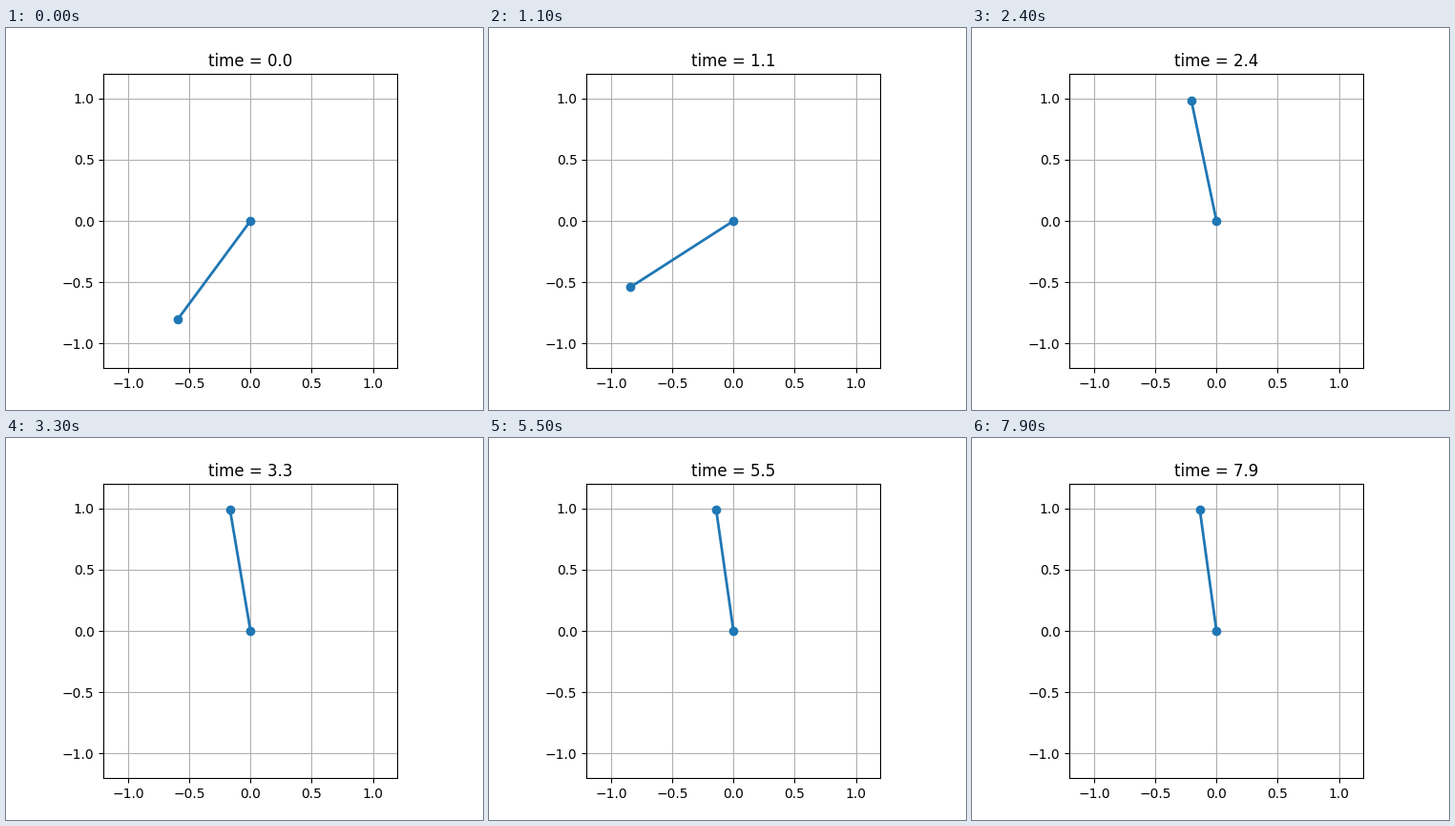
Write a matplotlib script that moves like this. It is 500 by 400 pixels and loops after 8000 ms.

```python
import numpy as np
import matplotlib.pyplot as plt
from matplotlib.animation import FuncAnimation

plt.rcParams["text.kerning_factor"] = 6

DT = 0.1
FRAMES = 80
SETTLED = 3.2

# Key poses: time in s, angle in degrees clockwise from straight down
KEY_T = np.array([0, 0.4, 0.78, 1.1, 1.3, 1.6, 1.8, 2.4, 2.7, SETTLED])
KEY_A = np.array([36.5, 56, 86, 57.3, 4, -102, -143.3, -191.8, -190.3, -189])
SPEED = np.gradient(KEY_A, KEY_T)
SPEED[[0, -1]] = 0


def swing(t):
    """Smooth cubic path through the key poses, resting after the last."""
    t = min(t, SETTLED)
    i = min(np.searchsorted(KEY_T, t, side="right"), len(KEY_T) - 1)
    h = KEY_T[i] - KEY_T[i - 1]
    s = (t - KEY_T[i - 1]) / h
    r = 1 - s
    return (r * r * ((1 + 2 * s) * KEY_A[i - 1] + s * h * SPEED[i - 1])
            + s * s * ((1 + 2 * r) * KEY_A[i] - r * h * SPEED[i]))


def balance(t):
    """Chatter around the balance point, drifting slowly upright."""
    gain = np.clip((t - 2.7) / 0.5, 0, 1)
    drift = 0.12 * max(t - SETTLED, 0)
    return 0.85 * gain * np.cos(2 * np.pi * (t - 4.25) / 0.4) + drift


fig, ax = plt.subplots(figsize=(5, 4), dpi=100)
ax.set_aspect("equal")
ax.set(xlim=(-1.2, 1.2), ylim=(-1.2, 1.2))
ax.grid()
rod, = ax.plot([], [], "o-", lw=2)
title = ax.set_title("")


def update(frame):
    t = frame * DT
    angle = np.radians(swing(t) + balance(t))
    rod.set_data([0, -np.sin(angle)], [0, -np.cos(angle)])
    title.set_text(f"time = {t:.1f}")
    return rod, title


anim = FuncAnimation(fig, update, frames=FRAMES, interval=1000 * DT,
                     repeat=True, repeat_delay=0, blit=False)
plt.show()
```
